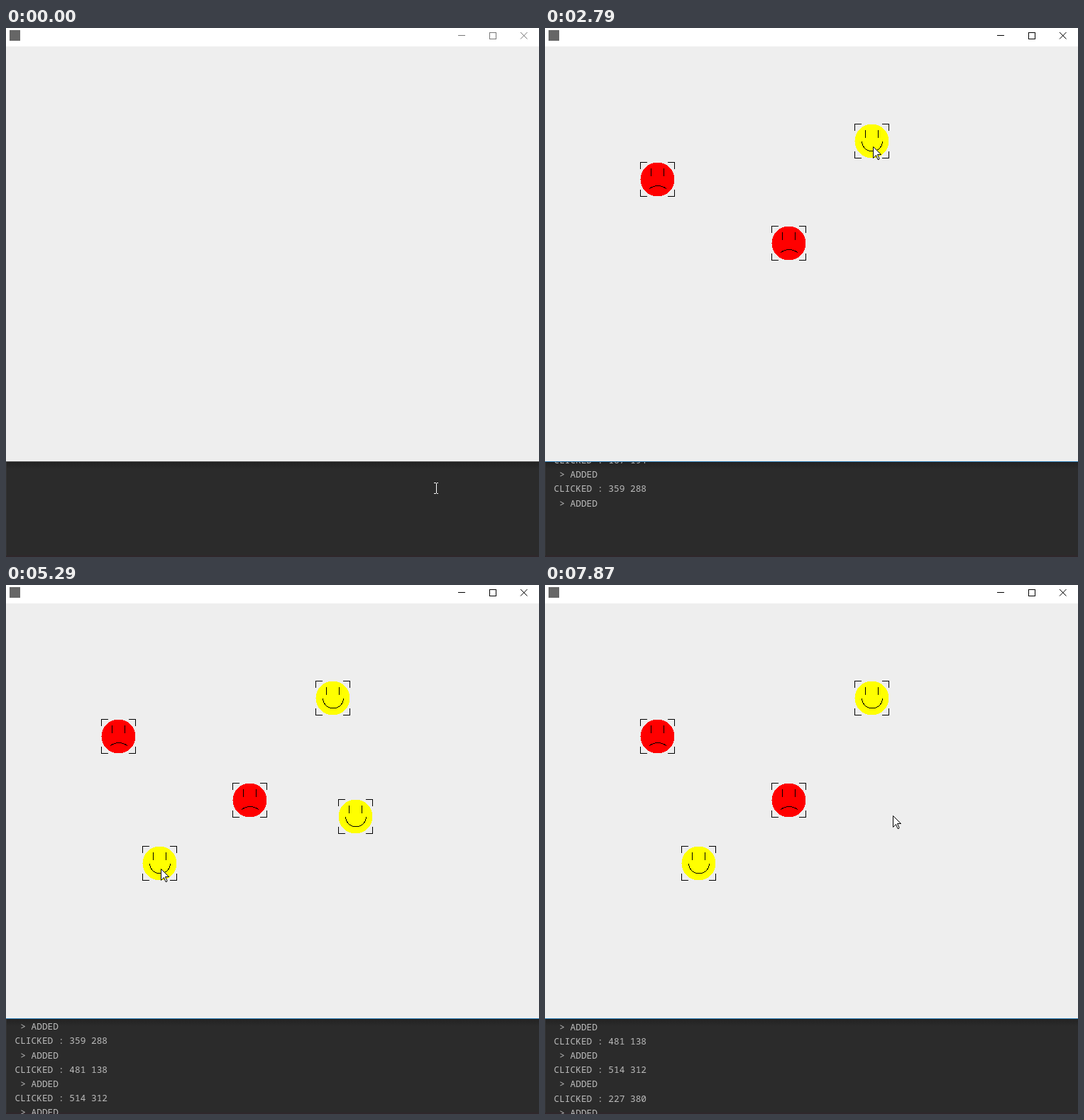
An HTML page that plays this animation: 751 by 746 pixels, repeating every 8000 ms.

```html
<!DOCTYPE html>
<html lang="en">
<head>
<meta charset="utf-8">
<title>Click faces</title>
<style>
  html, body { margin: 0; width: 100%; height: 100%; overflow: hidden; background: #2b2b2b; }
  svg { display: block; }
  text { font: 12.8px "Noto Sans Mono", "DejaVu Sans Mono", monospace; fill: #bbb; white-space: pre; }
  .ink { fill: none; stroke: #000; shape-rendering: crispEdges; }
</style>
</head>
<body>
<svg width="751" height="746" viewBox="0 0 751 746">
  <defs>
    <linearGradient id="shade" x2="0" y2="1">
      <stop offset="0" stop-color="#222"/>
      <stop offset="1" stop-color="#2b2b2b"/>
    </linearGradient>
    <clipPath id="consoleClip"><rect y="612" width="751" height="134"/></clipPath>
  </defs>
  <rect width="751" height="746" fill="#2b2b2b"/>
  <rect y="612" width="751" height="10" fill="url(#shade)"/>
  <rect y="612" width="1" height="134" fill="#333"/>
  <rect y="744" width="751" height="2" fill="#30272b"/>
  <g clip-path="url(#consoleClip)"><g id="log"></g></g>
  <rect width="751" height="611" fill="#eee"/>
  <rect width="751" height="26" fill="#fff"/>
  <rect id="edge" y="611" width="751" height="1"/>
  <rect x="5" y="3" width="15" height="15" fill="#666"/>
  <g id="buttons" fill="none">
    <path d="M637 10.5h10M681.5 6.5h9v9h-9z" shape-rendering="crispEdges"/>
    <path d="M725 6l9.5 9.5M734.5 6l-9.5 9.5"/>
  </g>
  <g id="faces"></g>
  <path id="arrow" d="M.5.5V16.5L4.5 12.5L7 18.5H8.5L9 17L6.5 11.5H11.5Z" fill="#fff" stroke="#000"/>
  <path id="beam" d="M-3 -7.5H-.5M.5 -7.5H3M-3 7.5H-.5M.5 7.5H3M0 -7V7" fill="none" stroke="#fff" shape-rendering="crispEdges"/>
</svg>
<script>
const LOOP = 8000, ACTIVE_AT = 530, LOG_DELAY = 300, STEP = 52;
const PITCH = 20.2, SCALE = 0.962, CONSOLE_TOP = 611;
const $ = id => document.getElementById(id);

// click coordinates are in window units; box and cursor follow from them
function face(cx, cy, from, sad, to = LOOP) {
  const x = Math.round(cx * SCALE - 26.5), y = Math.round(cy * SCALE + 2.2);
  return { x, y, sad, from, to, label: `CLICKED : ${cx} ${cy}`, tip: [x + 26, y + 32] };
}
const faces = [
  face(167, 194, 540, true),
  face(359, 288, 1500, true),
  face(481, 138, 2660, false),
  face(514, 312, 3450, false, 7760),
  face(227, 380, 5230, false)
];

// cursor legs: start, end, destination, sideways bend
const home = [606, 649];
const legs = [
  [40, 280, faces[0].tip, 0],
  [970, 1220, faces[1].tip, 0],
  [1750, 1910, [379, 332], 0],
  [1940, 2380, faces[2].tip, 0],
  [2970, 3190, faces[3].tip, 0],
  [3500, 3940, faces[4].tip, 0.1],
  [5520, 5700, [800, 640], 0],
  [6500, 6540, [753, 671], 0],
  [6600, 7130, [333, 289], 0.3],
  [7130, 7600, [490, 325], 0]
];

function cursorAt(t) {
  let pos = home;
  for (const [start, end, dest, bend] of legs) {
    if (t < start) break;
    const steps = Math.round((end - start) / STEP) || 1;
    const k = Math.min(1, Math.floor((t - start) / (end - start) * steps) / steps);
    const u = k * (2 - k);
    const [dx, dy] = [dest[0] - pos[0], dest[1] - pos[1]];
    const bow = 2 * u * (1 - u) * bend;
    pos = [pos[0] + dx * u + dy * bow, pos[1] + dy * u - dx * bow].map(Math.round);
  }
  return pos;
}

function add(parent, tag, attrs = {}) {
  const el = document.createElementNS("http://www.w3.org/2000/svg", tag);
  for (const key in attrs) el.setAttribute(key, attrs[key]);
  return parent.appendChild(el);
}

const place = (el, x, y) => el.setAttribute("transform", `translate(${x} ${y})`);
const show = (el, on) => { el.style.display = on ? "" : "none"; };

function makeFace({ x, y, sad }) {
  const g = add($("faces"), "g");
  place(g, x, y);
  add(g, "circle", { cx: 24.5, cy: 24.5, r: 24, fill: sad ? "#f00" : "#ff0", "shape-rendering": "crispEdges" });
  const ink = d => add(g, "path", { class: "ink", d });
  ink("M0 .5H10M39 .5H49M0 48.5H10M39 48.5H49M.5 0V10M48.5 0V10M.5 39V49M48.5 39V49");
  ink("M15.5 9V20M33.5 9V20");
  ink(sad ? "M13 37.5Q25 29.5 37 37.5" : "M10.5 24.5A14.5 14.5 0 0 0 39.5 24.5");
  return g;
}

function makeLog(label, i) {
  const g = add($("log"), "g");
  [label, " > ADDED"].forEach((line, n) => {
    const y = Math.round(614 + PITCH * (2 * i + n));
    add(g, "text", { x: 12.5, y }).textContent = line;
  });
  return g;
}

faces.forEach((f, i) => {
  f.el = makeFace(f);
  f.lines = makeLog(f.label, i);
});

function draw(t) {
  const active = t >= ACTIVE_AT;
  $("buttons").setAttribute("stroke", active ? "#000" : "#777");
  $("edge").setAttribute("fill", active ? "#2f7fb8" : "#555");

  let logged = 0;
  for (const f of faces) {
    const done = t >= f.from + LOG_DELAY;
    show(f.el, t >= f.from && t < f.to);
    show(f.lines, done);
    logged += done;
  }
  // the console keeps its last line in view once it is full
  place($("log"), 0, -Math.max(0, Math.round(7 + 2 * PITCH * (logged - 4))));

  const [x, y] = cursorAt(t);
  show($("arrow"), y <= CONSOLE_TOP);
  show($("beam"), y > CONSOLE_TOP);
  place($("arrow"), x, y);
  place($("beam"), x, y);
}

const begin = performance.now();
function tick() {
  draw((performance.now() - begin) % LOOP);
  requestAnimationFrame(tick);
}
tick();
</script>
</body>
</html>
```
